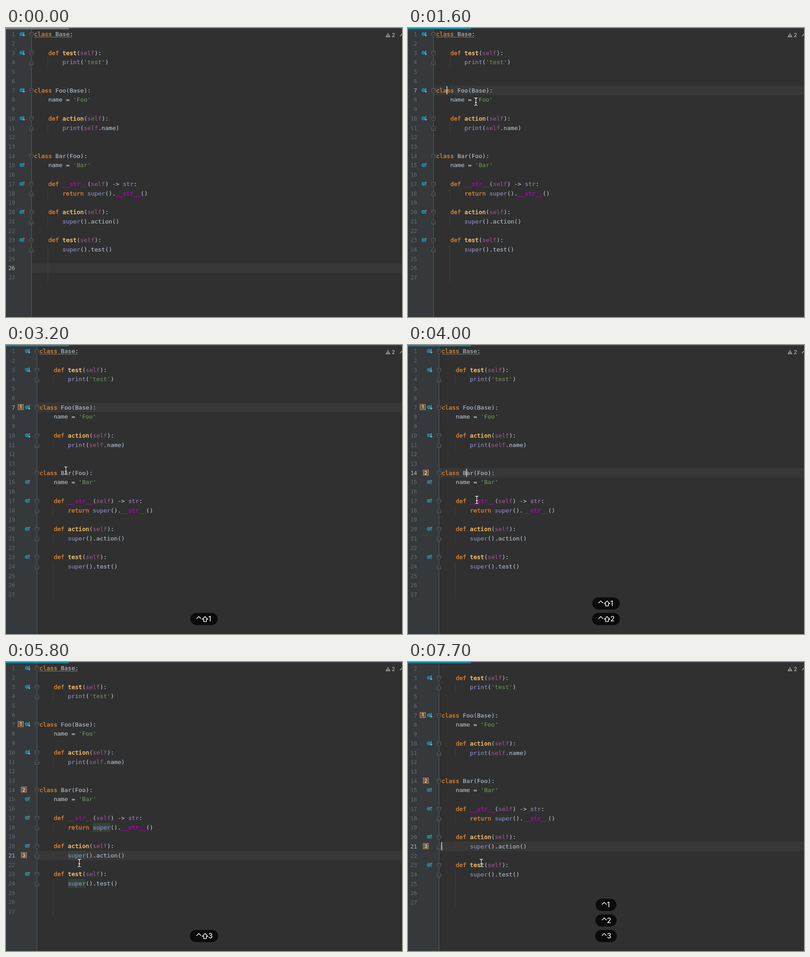
Animation of 875 by 640 pixels, one loop 8000 ms. Source, as an HTML page:

```html
<!DOCTYPE html>
<html lang="en">
<head>
<meta charset="utf-8">
<title>Editor bookmarks</title>
<style>
  html, body { margin: 0; width: 100%; height: 100%; overflow: hidden; background: #303030; }
  svg { display: block; width: 875px; height: 640px; }
  text { white-space: pre; }
  .code { font: 13.04px "DejaVu Sans Mono", "Noto Sans Mono", monospace; color: #b2bfcc; }
  .code tspan { fill: currentColor; stroke: currentColor; stroke-width: .15; }
  .num { font: 12px "DejaVu Sans Mono", "Noto Sans Mono", monospace; fill: #676b6e; text-anchor: end; }
  .num.on { fill: #bdbdbd; }
  .ui { font-family: Inter, Roboto, sans-serif; font-weight: 500; }
  .code .key { color: #d17f32; stroke-width: .5; }
  .code .fn { color: #ffc66d; stroke-width: .5; }
  .code .dunder { color: #b200b2; stroke-width: .5; }
  .code .self { color: #98588f; }
  .code .builtin { color: #8c8cca; }
  .code .str { color: #6a9259; }
</style>
</head>
<body>
<script>
const LOOP = 8000, STEP = 100;
const PITCH = 20.73, CHAR = 7.85, LEFT = 62;
const FOCUS = 1100, SCROLL = 7400, PILL_LIFE = 2100, LAG = 100;
const LINES = `class Base:

    def test(self):
        print('test')


class Foo(Base):
    name = 'Foo'

    def action(self):
        print(self.name)


class Bar(Foo):
    name = 'Bar'

    def __str__(self) -> str:
        return super().__str__()

    def action(self):
        super().action()

    def test(self):
        super().test()


`.split('\n');

const CLICKS = [
  { at: 1000, row: 7, col: 3 }, { at: 3400, row: 14, col: 7 }, { at: 4800, row: 21, col: 9 }
];
// shift sets a bookmark at the caret, without it the caret jumps there
const PRESSES = [
  { at: 2500, digit: 1, shift: true }, { at: 3700, digit: 2, shift: true },
  { at: 5000, digit: 3, shift: true }, { at: 6800, digit: 1 },
  { at: 7300, digit: 2 }, { at: 7600, digit: 3 }
];
const HOPS = [
  { from: 100, to: 200, x: 282, y: 324 }, { from: 300, to: 600, x: 93, y: 147 },
  { from: 700, to: 900, x: 88, y: 135 }, { from: 1200, to: 1600, x: 150, y: 163 },
  { from: 2700, to: 3300, x: 131, y: 287 }, { from: 3600, to: 4000, x: 152, y: 343 },
  { from: 4500, to: 4800, x: 145, y: 428 }, { from: 5000, to: 5300, x: 162, y: 445 }
];

const rowY = row => 13.9 + (row - 1) * PITCH;
const colX = col => LEFT + col * CHAR;
const latest = (list, t) => list.findLast(e => e.at <= t);

const carets = [{ at: 0, row: 26, col: 0 }];
for (const c of CLICKS) carets.push({ ...c, at: c.at + LAG });
const marks = PRESSES.filter(p => p.shift)
  .map(p => ({ at: p.at + LAG, digit: p.digit, row: latest(carets, p.at).row }));
for (const p of PRESSES.filter(p => !p.shift))
  carets.push({ at: p.at + LAG, row: marks[p.digit - 1].row, col: 0 });

function el(parent, tag, attrs = {}, text) {
  const node = document.createElementNS('http://www.w3.org/2000/svg', tag);
  set(node, attrs);
  if (text !== undefined) node.textContent = text;
  parent.append(node);
  return node;
}
function set(node, attrs) { for (const k in attrs) node.setAttribute(k, attrs[k]); }
const move = (node, x, y) => set(node, { transform: `translate(${x} ${y})` });
const show = (node, on) => set(node, { visibility: on ? 'visible' : 'hidden' });

function tokenClass(word, before) {
  if (/^(class|def|return)$/.test(word)) return 'key';
  if (word === '__str__') return 'dunder';
  if (/def $/.test(before)) return 'fn';
  if (word === 'self') return 'self';
  if (/^(print|super|str)$/.test(word)) return 'builtin';
  return word[0] === "'" ? 'str' : '';
}

function drawCode(line, row) {
  const text = el(body, 'text', { class: 'code', x: LEFT, y: rowY(row) + 4.3 });
  for (const m of line.matchAll(/'\w+'|\w+|[^\w']+/g))
    el(text, 'tspan', { class: tokenClass(m[0], line.slice(0, m.index)) }, m[0]);
}

function drawFold(row, end) {
  const g = el(body, 'g', { fill: '#303030', stroke: '#66696b' });
  set(g, { transform: `translate(56.5 ${rowY(row) + .8}) scale(1 ${end ? -1 : 1})` });
  el(g, 'path', { d: 'M-4-4.5H4V1.5L0 5L-4 1.5Z' });
  el(g, 'path', { d: 'M-2-.7H2' });
}

function drawArrow(row, up) {
  const g = el(body, 'g', { fill: 'none' });
  move(g, 34, rowY(row) - .5);
  el(g, 'circle', { r: 4.2, fill: '#0c97b0' });
  el(g, 'circle', { r: 1.7, stroke: '#21586a' });
  el(g, 'path', {
    d: 'M5.3-5V4.2M3 2L5.3 4.5L7.6 2', stroke: up ? '#cc5f3c' : '#aab2b8',
    'stroke-width': 1.2, transform: up ? 'scale(1 -1)' : ''
  });
}

const svg = el(document.body, 'svg', { viewBox: '0 0 875 640' });
const gutter = el(svg, 'rect', { height: 640, fill: '#35393b' });
const page = el(svg, 'g');
const band = el(page, 'rect', { width: 875, height: 21, fill: '#383838' });
const body = el(page, 'g');
el(body, 'rect', { x: 56, width: 1, height: 680, fill: '#5a5c5d' });

// other uses of the word under the caret light up
const USED = 'super';
const usages = [];
const numbers = LINES.map((line, i) => {
  const row = i + 1, y = rowY(row);
  const declares = /^ *(class|def) /.test(line), inner = /^ {8}/.test(line);
  const found = line.indexOf(USED);
  if (found >= 0) usages.push(el(body, 'rect', {
    x: colX(found), y: y - 10, width: USED.length * CHAR, height: 20, fill: '#364339'
  }));
  if (inner || row > 24)
    el(body, 'rect', { x: 92, y: y - PITCH / 2, width: 1, height: PITCH, fill: '#404040' });
  drawCode(line, row);
  if (declares || inner) drawFold(row, inner);
  if (declares && row < 14) drawArrow(row, false);
  if (row > 14 && /^ {4}\w/.test(line)) drawArrow(row, true);
  return el(page, 'text', { class: 'num', x: 20, y: y + 4.3 }, row);
});
el(body, 'path', {
  d: 'M62 19.5' + 'l2 1.6l2-1.6'.repeat(21), fill: 'none', stroke: '#969587', 'stroke-width': .9
});

const icons = marks.map(({ digit, row }) => {
  const g = el(page, 'g');
  move(g, row < 14 ? 32.5 : 39.5, rowY(row) - .8);
  el(g, 'rect', { x: -6, y: -6, width: 12, height: 12, fill: '#73563c', stroke: '#b98b5e' });
  el(g, 'text', {
    class: 'ui', y: 4, 'font-size': 11, 'text-anchor': 'middle', fill: '#eee'
  }, digit);
  return g;
});
const caret = el(body, 'rect', { width: 2, height: 18, fill: '#c4c4c4' });

el(svg, 'rect', { width: 875, height: 2, fill: '#3e4143' });
const tab = el(svg, 'rect', { width: 139, height: 3 });
el(svg, 'path', { d: 'M844 10.5L849.5 20.5H838.5Z', fill: '#96938b' });
el(svg, 'path', { d: 'M844 13.5V17M844 18V19.3', stroke: '#303030', 'stroke-width': 1.3 });
el(svg, 'text', { class: 'ui', x: 852.5, y: 20, 'font-size': 11.5, fill: '#bcbcbc' }, 2);
el(svg, 'path', { d: 'M870.5 18L875.5 13', stroke: '#b8b8b8', 'stroke-width': 1.3 });

const pills = PRESSES.map(({ digit, shift }) => {
  const g = el(svg, 'g', { fill: 'none', stroke: '#f2f2f2', 'stroke-width': 1.5 });
  const w = (shift ? 59.5 : 45) + digit;
  el(g, 'rect', { x: -w / 2, y: -13.5, width: w, height: 27, rx: 13.5, fill: '#0b0b0b', stroke: 'none' });
  el(g, 'path', { d: `M${shift ? -16.5 : -9} -.7l5-4.8l5 4.8` });
  if (shift) el(g, 'path', { d: 'M2.3-5.5L8.5 .8H5.3V5.6H-.7V.8H-3.9Z', 'stroke-linejoin': 'round' });
  el(g, 'text', {
    class: 'ui', x: shift ? 9.5 : 2, y: 5.5, 'font-size': 15.5, fill: '#f2f2f2', stroke: 'none'
  }, digit);
  return g;
});

const dot = el(svg, 'circle', { r: 25, fill: '#f50b0d' });
const mouse = el(svg, 'g', { fill: 'none' });
const beam = 'M-3.5-8.5Q0-8.5 0-6Q0-8.5 3.5-8.5M0-6V6M-3.5 8.5Q0 8.5 0 6Q0 8.5 3.5 8.5M-2 2H2';
el(mouse, 'path', { d: beam, stroke: '#161616', 'stroke-width': 3 });
el(mouse, 'path', { d: beam, stroke: '#fff', 'stroke-width': 1.3 });

function mouseAt(t) {
  let x = 158, y = 332;
  for (const hop of HOPS) {
    const p = Math.min(1, Math.max(0, (t - hop.from) / (hop.to - hop.from)));
    const ease = p * p * (3 - 2 * p);
    x += (hop.x - x) * ease;
    y += (hop.y - y) * ease;
  }
  return [x, y];
}

function wordAt({ row, col }) {
  for (const m of LINES[row - 1].matchAll(/\w+/g))
    if (col >= m.index && col <= m.index + m[0].length) return m[0];
}

function render(t) {
  const place = latest(carets, t), age = t - place.at;
  const indent = t >= marks[0].at ? 12 : 0;
  const lit = (t + 700) % 1000 < 500 || age < 600;

  set(gutter, { width: 56 + indent });
  move(page, 0, t >= SCROLL ? -20 : 0);
  move(body, indent, 0);
  set(band, { x: 57 + indent, y: rowY(place.row) - 10.6 });
  set(caret, { x: colX(place.col) - .5, y: rowY(place.row) - 9.3 });
  show(caret, t >= FOCUS && lit);
  set(tab, { fill: t < FOCUS ? '#74787b' : '#0d84a2' });
  numbers.forEach((n, i) => n.classList.toggle('on', i + 1 === place.row));
  icons.forEach((icon, i) => show(icon, t >= marks[i].at));
  const match = age >= 400 && wordAt(place) === USED;
  usages.forEach(u => show(u, match));

  // the newest key sits at the bottom
  let slot = 0;
  for (let i = PRESSES.length - 1; i >= 0; i--) {
    const held = t - PRESSES[i].at, on = held >= 0 && held < PILL_LIFE;
    show(pills[i], on);
    if (on) move(pills[i], 437.5, 606.8 - 34.5 * slot++);
  }

  const [x, y] = mouseAt(t);
  move(mouse, x, y);
  show(mouse, t >= HOPS[0].from);
  const click = latest(CLICKS, t), since = click ? t - click.at : LOOP;
  set(dot, { cx: x - .5, cy: y - 2.5, opacity: since < 200 ? .95 : since < 300 ? .5 : 0 });
}

const start = performance.now();
let last = -1;
function tick() {
  const elapsed = Math.max(0, performance.now() - start) % LOOP;
  const t = Math.floor(elapsed / STEP) * STEP;
  if (t !== last) render(last = t);
  requestAnimationFrame(tick);
}
tick();
</script>
</body>
</html>
```
